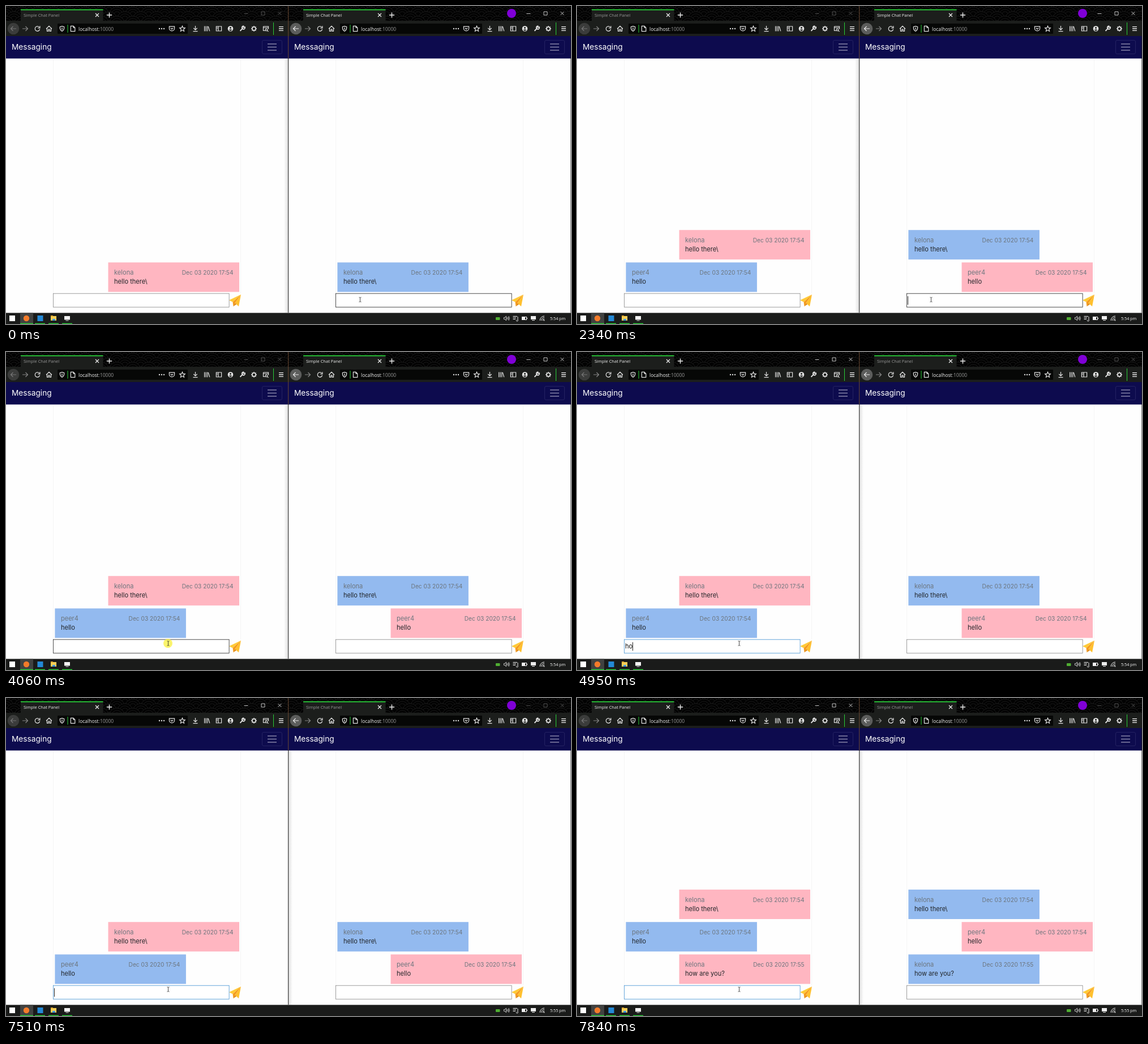
Recreate the animation shown at these times as an HTML page. Size 998x561 px, loop 8 s.

```html
<!DOCTYPE html>
<html lang="en">
<head>
<meta charset="utf-8">
<title>Chat demo</title>
<style>
html, body { margin: 0; width: 100%; height: 100%; overflow: hidden; background: #000; }
svg { display: block; width: 998px; height: 561px; }
.ui { font-family: "Open Sans", "Noto Sans", sans-serif; }
.page { font-family: Inter, "Open Sans", sans-serif; font-size: 11.1px; }
</style>
</head>
<body>
<svg id="stage" viewBox="0 0 998 561" xmlns="http://www.w3.org/2000/svg">
  <defs>
    <pattern id="scales" width="28" height="16" patternUnits="userSpaceOnUse"></pattern>
    <linearGradient id="shade"><stop stop-color="#000" stop-opacity="0"/><stop offset="1" stop-color="#000" stop-opacity=".12"/></linearGradient>
  </defs>
  <g id="fixed"></g>
  <g id="live"></g>
</svg>
<script>
const LOOP = 8000, SHIFT = 499, GREEN = '#28cf38';
const $ = id => document.getElementById(id);

const rect = (x, y, w, h, fill, extra = '') =>
  `<rect x="${x}" y="${y}" width="${w}" height="${h}" fill="${fill}" ${extra}/>`;
const frame = (x, y, w, h, color, extra = '') =>
  rect(x + .5, y + .5, w - 1, h - 1, 'none', `stroke="${color}" ${extra}`);
const circle = (x, y, r, fill) => `<circle cx="${x}" cy="${y}" r="${r}" fill="${fill}"/>`;
const text = (x, y, str, fill, extra = '') => `<text x="${x}" y="${y}" fill="${fill}" ${extra}>${str}</text>`;
const line = (x, y, d, color = '#e4e4e4', width = 1.2, fill = 'none') =>
  `<path transform="translate(${x} ${y})" d="${d}" fill="${fill}" stroke="${color}" stroke-width="${width}"/>`;
const shape = (d, fill) => `<path d="${d}" fill="${fill}"/>`;
const group = (dx, body, cls = '') => `<g transform="translate(${dx} 0)" class="${cls}">${body}</g>`;

const ICON = {
  left: 'M5 0H-4.5M-.5-4-4.5 0-.5 4',
  right: 'M-5 0H4.5M.5-4 4.5 0 .5 4',
  reload: 'M3.3-2.5A4.2 4.2 0 1 0 4.1 1M4.4-4.8V-1.2H.8',
  home: 'M-5 .3 0-4.6 5 .3M-3.5-.5V4.3H-1V1H1V4.3H3.5V-.5',
  shield: 'M0-4.4 3.7-3.3Q4 2.4 0 4.4-4 2.4-3.7-3.3ZM0-2V2',
  file: 'M-3.6-4.6H1L3.8-1.8V4.6H-3.6ZM1-4.6V-1.8H3.8',
  pocket: 'M-4.6-3.8H4.6V-.5A4.6 4.4 0 0 1-4.6-.5ZM-2.3-1.2 0 1 2.3-1.2',
  star: 'M0-4.8 1.4-1.6 4.8-1.3 2.2 1 3 4.4 0 2.6-3 4.4-2.2 1-4.8-1.3-1.4-1.6Z',
  download: 'M0-5V2M-3.2-1 0 2.2 3.2-1M-4 4.6H4',
  library: 'M-4.4-4.4V4.4M-1.8-4.4V4.4M.8-4.4V4.4M2.2-4 4.8 4.4',
  sidebar: 'M-4.6-4H4.6V4H-4.6ZM-1-4V4M-3.5-2H-2M-3.5 0H-2',
  gear: 'M0-5V-3M0 3V5M-5 0H-3M3 0H5M-3.5-3.5-2-2M2 2 3.5 3.5M-3.5 3.5-2 2M2-2 3.5-3.5M3 0A3 3 0 1 1-3 0 3 3 0 1 1 3 0',
  wrench: 'M-4 4 .8-.8M4.4-3A2.7 2.7 0 1 1 2-4.5L1.8-2.2Z',
  shot: 'M-4.5-4H4.5V1M-4.5-4V3.5H0M-4.5-2H4.5M2.6 2A1.8 1.8 0 1 1-1 2 1.8 1.8 0 1 1 2.6 2M2.3 3.2 4.5 5',
  menu: 'M-4-3.4H4M-4 0H4M-4 3.4H4',
  cross: 'M-3-3 3 3M-3 3 3-3',
  plus: 'M-4.6 0H4.6M0-4.6V4.6'
};
const icon = (name, x, y = 40, color, width) => line(x, y, ICON[name], color, width);

// gap: extra room in the address bar when one toolbar button is missing
function browser(dx, gap) {
  const bar = gap + 230;
  let s = rect(26, 6, 145.5, 21, '#1c1e1c') + rect(26, 5.7, 145.5, 1.8, GREEN)
    + icon('cross', 161, 16, '#f0f0f0') + icon('plus', 182.5, 16, '#eee', 1.4)
    + rect(0, 26, 499, 27, '#1c1e1c') + rect(91, 31, bar, 18, '#060706', 'rx="1"')
    + circle(13, 40, 10.3, gap ? '#5c5d5c' : '#3b3c3b') + icon('left', 13, 40, gap ? '#eee' : '#777')
    + icon('right', 34, 40, '#858585') + icon('reload', 55.5) + icon('home', 76)
    + icon('shield', 99) + rect(108.5, 33, 1, 14, GREEN) + icon('file', 118)
    + `<text x="128" y="43.5" font-size="8.5" fill="#f4f4f4">localhost<tspan fill="#999">:10000</tspan></text>`;
  const tools = [-4, 0, 4].map(d => circle(275 + d, 40, 1.2, '#ddd')).join('')
    + icon('pocket', 293) + icon('star', 311.5) + icon('download', 334.5) + icon('library', 355)
    + icon('sidebar', 376) + circle(396.5, 40, 4.8, '#e4e4e4') + circle(396.5, 38.5, 1.6, '#1c1e1c')
    + shape('M393.5 42.3Q396.5 40 399.5 42.3L396.5 44Z', '#1c1e1c')
    + icon('wrench', 417.5, 40, '#e4e4e4', 1.8) + icon('gear', 438, 40, '#e4e4e4', 1.5);
  s += group(gap, tools) + (gap ? '' : icon('shot', 459)) + rect(472, 29, 1, 22, GREEN) + icon('menu', 486, 40, '#eee', 1.3);
  return group(dx, s, 'ui');
}

function page(dx) {
  const plane = shape('M415 509 394 519 400.5 522.3Z', '#ffca38')
    + shape('M415 509 404.5 524 411 530Z', '#ffc02e')
    + shape('M415 509 400.5 522.3 401.5 530 404.5 524Z', '#f59b1e')
    + shape('M404.5 524 401.5 530 407 526.3Z', '#e08712');
  return group(dx, rect(0, 92, 499, 450, '#fefefe') + rect(0, 53, 499, 39.6, '#0d0b4e')
    + text(10, 77, 'Messaging', '#fff', 'style="font-size:13.7px"')
    + frame(452, 60, 36, 25, '#242262', 'rx="2.5"')
    + line(470, 72.5, 'M-8-5.5H8M-8 0H8M-8 5.5H8', '#8584a7', 1.3)
    + rect(83, 93, 1, 414, '#f5f5f5') + rect(414, 93, 1, 414, '#f5f5f5')
    + plane, 'page');
}

function taskbar() {
  const w = '#eee';
  let s = rect(0, 541.4, 998, 20, '#1a1b1a') + rect(25, 541.4, 23, 20, '#414241')
    + rect(6, 546, 10, 10, '#fff') + circle(36, 551, 5.2, '#f47b2a') + rect(55.5, 546, 10, 10, '#2489d6')
    + rect(79, 547, 10, 8, '#f8cf57') + rect(79, 546, 4, 2, '#e5a92f') + rect(82, 552, 5, 3, '#3f9be0')
    + rect(103, 547, 10, 6.5, '#f4f4f4') + rect(105.5, 554.5, 5, 1, '#ddd');
  for (const [x, width] of [[25, 23], [51, 18], [75, 18], [99, 18]]) s += rect(x, 559.6, width, 1.4, GREEN);
  s += rect(865, 549, 7.5, 5, '#4fae32', 'rx="1"')
    + line(884, 551, 'M-4.5-1.5H-3L-.5-3.8V3.8L-3 1.5H-4.5ZM1-1.5Q2 0 1 1.5M2.5-2.7Q4.4 0 2.5 2.7M4-3.8Q6.6 0 4 3.8', w, .8)
    + line(900, 551, 'M-4.5-3.5H3M-4.5-1H1M-4.5 1.5H0M4-3V3M4 3A1.4 1.4 0 1 1 2 2.6', w, 1)
    + frame(911, 548, 9, 6, w) + rect(912, 549, 5, 4, w) + rect(920, 550, 1, 2, w)
    + rect(927, 547, 9, 6, w) + rect(929, 554, 5, 1, w)
    + line(947, 551, 'M-4 4A8 8 0 0 1 4-4M-1.5 4A5.5 5.5 0 0 1 4-1.5M1 4A3 3 0 0 1 4 1', w, 1) + circle(950.5, 554.5, 1, w);
  return group(0, s, 'ui');
}

$('scales').innerHTML = rect(0, 0, 28, 16, '#000')
  + [[14, -8], [0, 0], [28, 0], [14, 8], [0, 16], [28, 16], [14, 24]].map(([x, y]) =>
    [14, 10, 6].map(r => `<circle cx="${x}" cy="${y}" r="${r}" fill="#020202" stroke="#272727" stroke-width=".8" stroke-dasharray="2 .7"/>`).join('')).join('');

$('fixed').innerHTML = rect(0, 0, 998, 27, 'url(#scales)')
  + browser(0, 0) + browser(SHIFT, 21) + circle(893, 13, 8, '#8000d7')
  + page(0) + page(SHIFT) + taskbar();

// [time, typed text]; a trailing bar is the caret
const rightTyping = [[0, ''], [30, '|'], [640, ''], [810, 'h|'], [910, 'he|'], [1180, 'hel|'], [1460, 'hell|'],
  [1730, 'hello|'], [2240, 'hello'], [2290, '|'], [2750, ''], [3260, '|'], [3770, '']];
const leftTyping = [[0, ''], [4110, '|'], [4630, ''], [4690, 'h|'], [4950, 'ho|'], [5060, 'how|'], [5220, 'how |'],
  [5400, 'how a|'], [5540, 'how ar|'], [5690, 'how are|'], [5830, 'how are |'], [6200, 'how are y|'],
  [6440, 'how are yo|'], [6620, 'how are you|'], [7240, 'how are you'], [7290, 'how are you?|'], [7510, '|'], [7840, '']];
const at = (steps, t) => steps.filter(s => s[0] <= t).pop()[1];

// [time sent, from the left window, name, clock, words]
const chat = [[0, true, 'kelona', '17:54', 'hello there\\'], [2340, false, 'peer4', '17:54', 'hello'],
  [7560, true, 'kelona', '17:55', 'how are you?']];

const pen = document.createElement('canvas').getContext('2d');
function input(dx, typed, border) {
  const words = typed.replace('|', '');
  pen.font = '11.1px Inter, "Open Sans", sans-serif';
  const end = Math.floor(85 + pen.measureText(words).width);
  return group(dx, rect(83.4, 507.2, 310.7, 24, '#fff', `stroke="${border}" stroke-width=".8"`)
    + text(85, 523, words, '#111') + (typed.endsWith('|') ? rect(end, 512, 1, 15, '#222') : ''), 'page');
}

function messages(t) {
  const sent = chat.filter(m => m[0] <= t);
  return sent.map(([, fromLeft, name, clock, words], i) => {
    const y = 452.4 - 57.2 * (sent.length - 1 - i);
    const card = own => {
      const x = own ? 180.5 : 86.4;
      return rect(x, y, 231.5, 52, own ? '#ffb6c1' : '#93baef')
        + text(x + 10.5, y + 22, name, '#6c757d')
        + text(x + 221, y + 22, `Dec 03 2020 ${clock}`, '#6c757d', 'text-anchor="end" style="font-size:10.2px"')
        + text(x + 10.5, y + 37.8, words, '#212529');
    };
    return group(0, card(fromLeft), 'page') + group(SHIFT, card(!fromLeft), 'page');
  }).join('');
}

function titleBar(dx, active) {
  const color = active ? '#c4c4c4' : '#505050';
  return group(dx, text(31, 19, 'Simple Chat Panel', active ? '#f0f0f0' : '#999', 'font-size="7.5"')
    + line(424, 13, 'M-3.5 .5H3.5', color, 1) + line(454, 13, 'M-3-3H3V3H-3Z', color, 1)
    + line(483.5, 13, ICON.cross, color, 1), 'ui');
}

const inside = (x, y, left) => x > left && x < left + 311 && y > 507 && y < 531;

function draw(t) {
  const p = Math.min(1, Math.max(0, (t - 3280) / 590)), e = p * p * (3 - 2 * p);
  const x = 625.5 - 339 * e, y = 518 - 4 * e - 18 * Math.sin(Math.PI * e);
  const overLeft = inside(x, y, 83), overRight = inside(x, y, 582), leftActive = t >= 4110;
  const pointer = overLeft || overRight
    ? line(x, y, 'M-2-4H-.6L0-3.4 .6-4H2M0-3.4V3.4M-2 4H-.6L0 3.4 .6 4H2', '#222', .8)
    : line(x, y, 'M0 0V10L2.3 8 4 11.5 5.6 10.8 4 7.4H7Z', '#111', .7, '#fff');
  const shadow = leftActive
    ? rect(0, 93, 7, 448, 'url(#shade)', 'transform="matrix(-1 0 0 1 506 0)"')
    : rect(491, 93, 7, 448, 'url(#shade)');
  return titleBar(0, leftActive) + titleBar(SHIFT, !leftActive)
    + messages(t)
    + input(0, at(leftTyping, t), leftActive ? '#3f8fd2' : overLeft ? '#222' : '#858585')
    + input(SHIFT, at(rightTyping, t), overRight ? '#222' : '#858585')
    + shadow + rect(498.2, 0, 1, 92, '#6b4a33') + rect(498.2, 92, 1, 449, '#161616') + rect(997.4, 27, .6, 514, '#161616')
    + (t >= 4060 && t < 4230 ? circle(286, 514, 8, 'rgba(250, 240, 60, .75)') : '') + pointer
    + group(0, text(961, 554, t < 6150 ? '5:54 pm' : '5:55 pm', '#fff', 'font-size="7.2"'), 'ui');
}

const start = performance.now();
let shown = '';
function tick() {
  const markup = draw((performance.now() - start) % LOOP);
  if (markup !== shown) $('live').innerHTML = shown = markup;
  requestAnimationFrame(tick);
}
tick();
</script>
</body>
</html>
```
